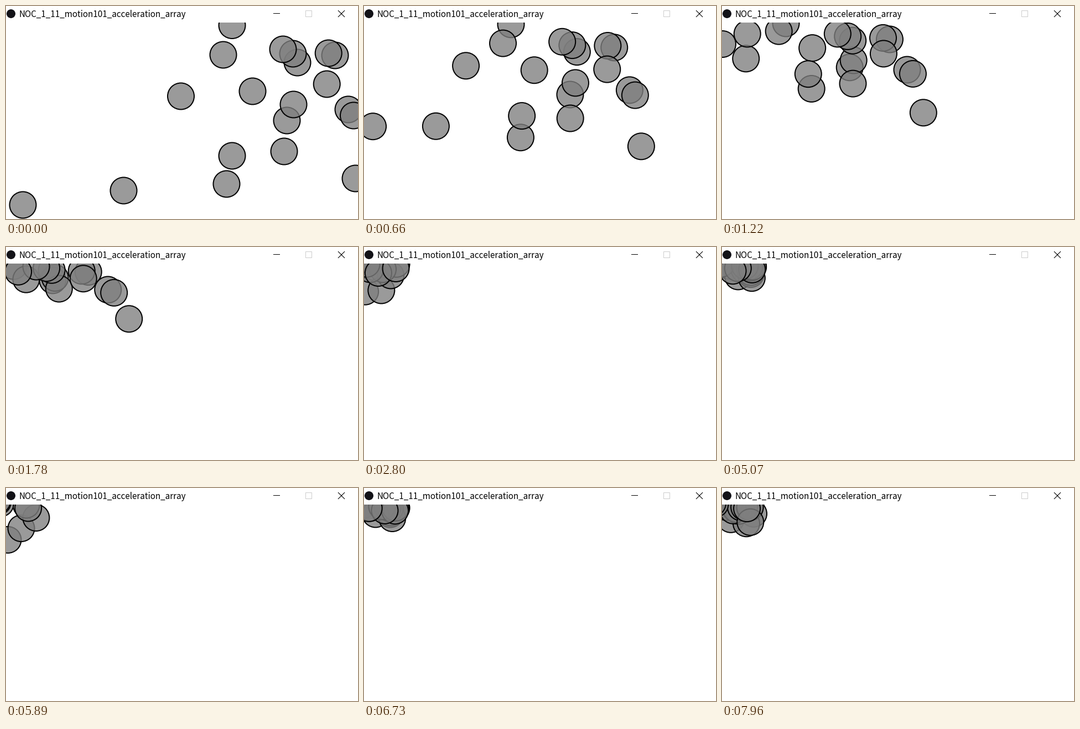
Animation of 636x386 px, one loop 8000 ms. Source, as a matplotlib script:

```python
import math

import numpy as np
import matplotlib.pyplot as plt
from matplotlib.animation import FuncAnimation
from matplotlib.patches import Circle, Rectangle

W, H, DPI = 636, 386, 100
PT = 72 / DPI                      # points per pixel
TICK, LOOP = 20, 8000              # ms
REDRAW = 140 / 3                   # ms each picture is held
MOUSE = np.array([-3.0, 30.0])     # corner of the sketch area
ACCEL, TOP_SPEED, RADIUS = 0.2, 5.0, 24
WARM_UP = 4                        # steps from rest before the loop starts

# Where each mover starts, in drawing order
START = np.array([
    (30.5, 360.5), (212.5, 334.5), (316, 163.5), (408.5, 35), (445.5, 154.5),
    (398.5, 322.5), (594.5, 89.5), (618.5, 187.5), (631.5, 312.5),
    (507.5, 207.5), (519.5, 178.5), (502.5, 263.5), (526.5, 102.5),
    (518.5, 86.5), (500.5, 78.5), (582.7, 85.5), (579.7, 141.5),
    (628, 198.5), (408.5, 271.5), (392.5, 88.5)])


def steps_at(ms):
    """Simulation steps done; the sketch runs a little faster once warm."""
    t = ms / 1000
    return math.ceil(55.2 * t + 6 * max(0, t - 1.78))


def toward(pos):
    d = MOUSE - pos
    return d / np.maximum(np.linalg.norm(d, axis=1, keepdims=True), 1e-9)


def simulate(count):
    pos = START.copy()
    vel = toward(pos) * ACCEL * WARM_UP
    track = [pos]
    for _ in range(count):
        vel = vel + ACCEL * toward(pos)
        speed = np.linalg.norm(vel, axis=1, keepdims=True)
        vel = vel * np.minimum(1, TOP_SPEED / np.maximum(speed, 1e-9))
        pos = pos + vel
        track.append(pos)
    return track


TRACK = simulate(steps_at(LOOP))

fig = plt.figure(figsize=(W / 100, H / 100), dpi=DPI, facecolor="white")
ax = fig.add_axes([0, 0, 1, 1])
ax.set_xlim(0, W)
ax.set_ylim(H, 0)
ax.axis("off")

balls = [ax.add_patch(Circle(p, RADIUS, fc=(127 / 255,) * 3 + (200 / 255,),
                             ec="black", lw=2 * PT, zorder=2 + 0.01 * i))
         for i, p in enumerate(START)]


def line(xs, ys, width=1):
    ax.plot(xs, ys, color="black", lw=width * PT, zorder=6, snap=False,
            solid_capstyle="butt")


# Title bar
ax.add_patch(Rectangle((0, 0), W, 30, fc="white", ec="none", zorder=5))
ax.add_patch(Circle((9, 14), 8, fc="#131318", ec="none", zorder=6))
ax.text(23.2, 20, "NOC_1_11_motion101_acceleration_array", color="black",
        family="Noto Sans CJK JP", size=15.2 * PT, va="baseline", zorder=6)
line([483, 495], [13.5, 13.5])
ax.add_patch(Rectangle((541.5, 8.5), 11, 11, fc="none", ec="#cccccc",
                       lw=PT, zorder=6, snap=False))
line([600, 612], [8, 20], width=1.1)
line([600, 612], [20, 8], width=1.1)


def update(frame):
    now = (frame + 0.5) * TICK
    shown = now // REDRAW * REDRAW
    for ball, pos in zip(balls, TRACK[steps_at(shown)]):
        ball.center = tuple(pos)
    return balls


anim = FuncAnimation(fig, update, frames=LOOP // TICK, interval=TICK,
                     repeat=True, repeat_delay=0, blit=False)
plt.show()
```
